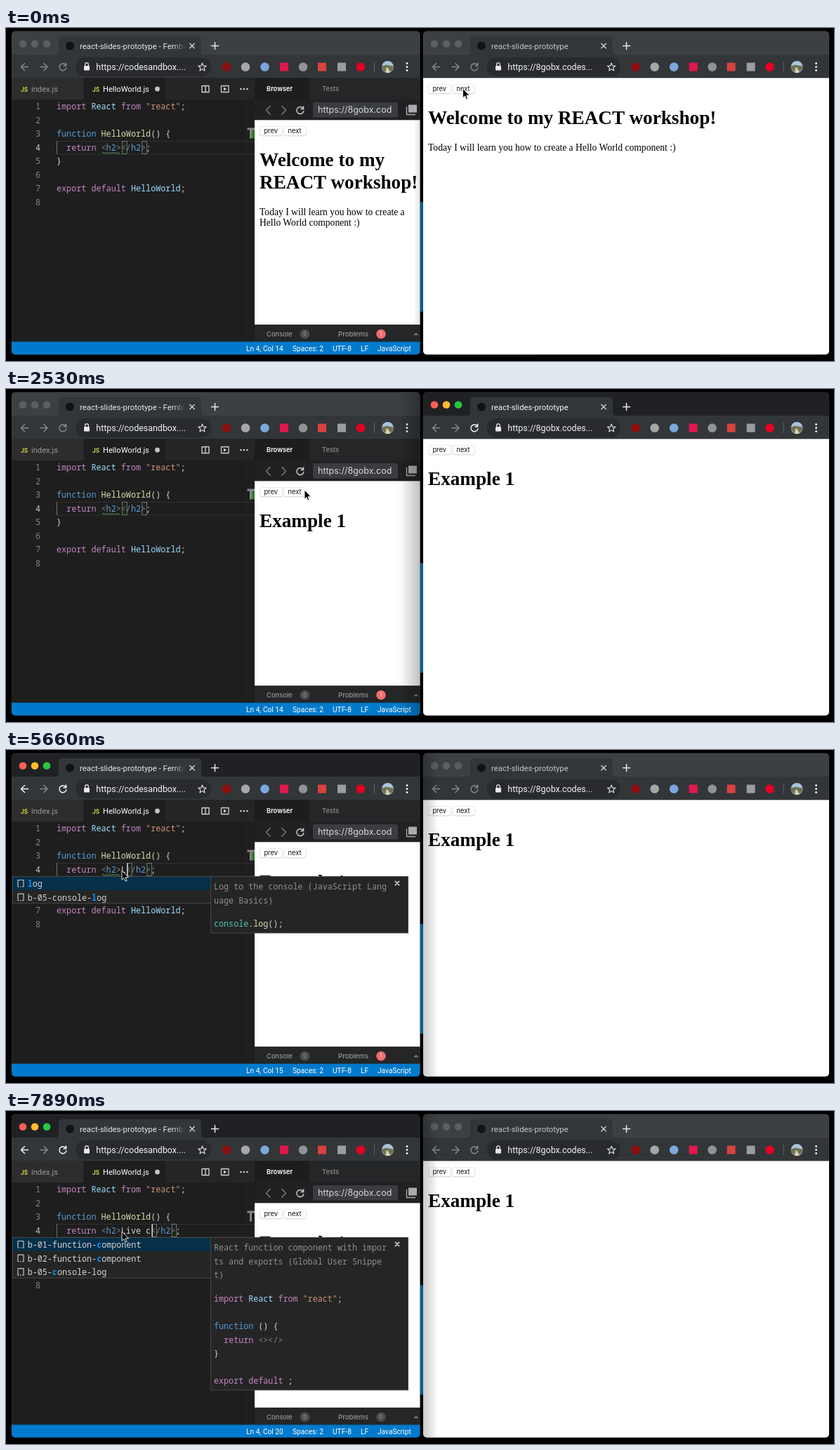
Animation, 1179 px wide and 475 px high, one loop 8000 ms. Source, as an HTML page:

```html
<!DOCTYPE html>
<html lang="en">
<head>
<meta charset="utf-8">
<title>Live coding slides</title>
<style>
html, body { margin: 0; width: 100%; height: 100%; overflow: hidden; background: #000; }
svg { display: block; width: 1179px; height: 475px; }
text { white-space: pre; }
.ui { font-family: Roboto, sans-serif; }
.inter { font-family: Inter, sans-serif; }
.mono { font: 11.77px "Noto Sans Mono", monospace; fill: #d4d4d4; }
.pop .mono { font-size: 11.72px; }
.serif { font-family: "Liberation Serif", "Times New Roman", serif; }
.line { fill: none; stroke-linecap: round; stroke-linejoin: round; }
.strip { fill: #3c4043; }
.on .strip { fill: #202124; }
.light { fill: #5b5e62; }
.on .light { fill: var(--c); }
.title { fill: #c3c6ca; }
.on .title { fill: #f4f5f6; }
.dim, .lit { stroke: #85898d; }
.on .lit { stroke: #f1f3f4; }
.k { fill: #c586c0; } .v { fill: #9cdcfe; } .s { fill: #ce9178; }
.f { fill: #569cd6; } .n { fill: #dcdcaa; } .g { fill: #808080; }
.c { fill: #4ec9b0; } .h { fill: #0097fb; font-weight: 600; } .p { fill: #d4d4d4; }
.d { fill: #8f8f8f; }
.off { display: none; }
</style>
</head>
<body>
<svg id="stage" viewBox="0 0 1179 475" xmlns="http://www.w3.org/2000/svg"></svg>
<script>
const LOOP = 8000, CH = 7.062, LINE = 19.57;
const rowY = n => 116 + LINE * (n - 1);
const esc = s => s.replace(/&/g, '&amp;').replace(/</g, '&lt;');
const paint = fill => fill ? `fill="${fill}"` : '';
const rect = (x, y, w, h, fill, extra = '') =>
  `<rect x="${x}" y="${y}" width="${w}" height="${h}" ${paint(fill)} ${extra}/>`;
const disc = (x, y, r, fill, extra = '') => `<circle cx="${x}" cy="${y}" r="${r}" ${paint(fill)} ${extra}/>`;
const text = (x, y, size, str, fill, cls = 'ui', extra = '') =>
  `<text x="${x}" y="${y}" font-size="${size}" fill="${fill}" class="${cls}" ${extra}>${esc(str)}</text>`;
const line = (d, color, w = 1.3, cls = '') =>
  `<path d="${d}" ${color ? `stroke="${color}"` : ''} stroke-width="${w}" class="line ${cls}"/>`;
const group = (id, body, cls = '') => `<g id="${id}" class="${cls}">${body}</g>`;
const cross = (x, y, r, color, w) => line(`M${x - r} ${y - r}l${2 * r} ${2 * r}m0 ${-2 * r}l${-2 * r} ${2 * r}`, color, w);

// Code is written as "k:import |v:React": a class letter, then its text.
const spans = src => src.split('|').map(p => `<tspan class="${p[0]}">${esc(p.slice(2))}</tspan>`).join('');
const code = (x, y, src, id = '') => `<text x="${x}" y="${y}" class="mono" ${id && `id="${id}"`}>${spans(src)}</text>`;

const IMPORT = 'k:import |v:React |k:from |s:"react"|p:;';

function reload(x, y, cls, color) {
  return line(`M${x + 4} ${y - 2.8}a5 5 0 1 0 .9 4M${x + 4.6} ${y - 5.4}v3.6h-3.6`, color, 1.5, cls);
}

// Tab strip and toolbar; the tools right of the address sit at their own offset.
function chrome(x, tools, title, url, titleFill, backCls) {
  const at = n => x + n, tool = n => tools + n;
  const arrow = (cx, dir, cls) =>
    line(`M${cx - 5 * dir} 55.5H${cx + 5 * dir}M${cx} 50.5L${cx + 5 * dir} 55.5L${cx} 60.5`, '', 1.5, cls);
  const lights = ['#ff5f57', '#febc2e', '#28c840']
    .map((c, i) => disc(at(24 + 17 * i), 22.5, 5.3, '', `class="light" style="--c:${c}"`)).join('');
  const badges = [[314, '#8d0c10', 1], [341, '#a5a8ab', 1], [368.5, '#7ba7dc', 1], [396, '#e0184d', 0],
    [423, '#8f9396', 1], [450, '#d8433f', 0], [478, '#9a9da0', 0], [505, '#e60023', 1]]
    .map(([n, c, round]) => round ? disc(tool(n), 55.5, 6.3, c) : rect(tool(n) - 6, 49.5, 12, 12, c)).join('');
  const star = Array.from({length: 10}, (_, i) => {
    const a = Math.PI * (i / 5 - .5), r = i % 2 ? 2.6 : 6;
    return (tool(279.5) + r * Math.cos(a)).toFixed(1) + ' ' + (56 + r * Math.sin(a)).toFixed(1);
  }).join('L');
  const ax = tool(543.5);
  return rect(at(8), 4, 582, 35, '', 'class="strip"') +
    `<path fill="#323639" d="M${at(69)} 38.5q6 0 6-6v-15q0-6 6-6h191q6 0 6 6v15q0 6 6 6z"/>` +
    rect(at(8), 38, 582, 33.3, '#323639') + lights +
    disc(at(91), 25.5, 6, '#111315') +
    `<text x="${at(105)}" y="29.5" font-size="11.36" class="ui title" ${titleFill ? `style="fill:${titleFill}"` : ''}>${title}</text>` +
    cross(at(265), 25.5, 3.3, '#d5d7d9', 1.3) +
    line(`M${at(292.5)} 25.5h10m-5 -5v10`, '#e6e8ea', 1.5) +
    arrow(at(26.5), -1, backCls) + arrow(at(54), 1, 'dim') + reload(at(81), 55.5, 'lit', '') +
    rect(at(99), 42, tool(292) - at(99), 27, '#282a2d', 'rx="13.5"') +
    rect(at(111), 54, 8, 6.5, '#e8eaed', 'rx="1"') +
    line(`M${at(112.7)} 54v-2a2.3 2.3 0 0 1 4.6 0v2`, '#e8eaed') +
    text(at(128.3), 60, 12.45, url, '#f1f3f4') +
    line(`M${star}Z`, '#e8eaed', 1.1) + badges +
    rect(tool(524), 48, 1, 15, '#5f6368') +
    disc(ax, 55.5, 8.5, '#a9c4dc') +
    `<path fill="#6f7250" d="M${ax - 8.4} 54.5l6 -2l10.8 2a8.5 8.5 0 0 1 -16.8 2z"/>` +
    `<path fill="#d8cfae" d="M${ax - 3} 63.4l1 -7h2l4 6.6q-3.5 1.6 -7 .4z"/>` +
    [50.5, 55.5, 60.5].map(y => disc(tool(571), y, 1.4, '#f1f3f4')).join('');
}

function button(x, y, label) {
  return rect(x + .5, y + .8, 32, 13.5, '#c4c4c4', 'rx="3"') +
    rect(x + .5, y + .3, 32, 13.2, '#fff', 'rx="3" stroke="#dcdcdc" stroke-width=".6"') +
    text(x + 6.4, y + 10.4, 9.35, label, '#111', 'inter');
}

function slides(x, y, heading, para) {
  const h1 = rows => rows.map((s, i) => text(x, y + 57.3 + 31.5 * i, 27.2, s, '#000', 'serif', 'font-weight="700"')).join('');
  const p = rows => rows.map((s, i) => text(x, y + 63.5 + 31.5 * heading.length + 15.7 * i, 13.6, s, '#000', 'serif')).join('');
  return button(x, y, 'prev') + button(x + 34, y, 'next') +
    `<g class="intro">${h1(heading)}${p(para)}</g>` +
    `<g class="example off">${h1(['Example 1'])}</g>`;
}

function editor() {
  const rows = [IMPORT, 'p:', 'f:function |n:HelloWorld|p:() {', '', 'p:}', 'p:', 'k:export default |v:HelloWorld|p:;', 'p:'];
  const body = rows.map((src, i) => src && code(72, rowY(i + 1), src)).join('');
  const nums = rows.map((_, i) =>
    `<text x="49" y="${rowY(i + 1)}" text-anchor="end" class="mono" style="fill:${i == 3 ? '#c6c6c6' : '#858585'}">${i + 1}</text>`).join('');
  const bracket = id => rect(0, 161.5, 6.6, 18, '#1b241b', `id="${id}" stroke="#7c7c7c" stroke-width=".9"`);
  return rect(8, 71, 346, 377, '#1e1e1e') + rect(8, 71, 346, 31, '#252526') +
    rect(8, 71, 102, 31, '#2d2d2d') + rect(111, 71, 116, 31, '#1e1e1e') +
    text(21, 90.5, 8.5, 'JS', '#cbcb41', 'ui', 'font-weight="700"') + text(36, 90.8, 11.15, 'index.js', '#9b9b9b') +
    text(123, 90.5, 8.5, 'JS', '#cbcb41', 'ui', 'font-weight="700"') + text(138, 90.8, 11.15, 'HelloWorld.js', '#fff') +
    disc(215.5, 87, 3.4, '#c5c5c5') +
    line('M279 82.5h10v9h-10zM284 82.5v9', '#d0d0d0', 1.4) +
    line('M306.5 82.5h10.5v9h-10.5z', '#d0d0d0', 1.3) + '<path d="M310 84.6l4.2 2.4l-4.2 2.4z" fill="#d0d0d0"/>' +
    [334.5, 339, 343.5].map(x => disc(x, 87, 1.3, '#d0d0d0')).join('') +
    rect(342.5, 102, .8, 345, '#282828') +
    rect(72, 161, 282, .9, '#333') + rect(72, 179.5, 282, .9, '#333') + rect(72, 161, 1, 19, '#707070') +
    nums + body + bracket('open') + bracket('close') + code(72, rowY(4), 'p:', 'typed') +
    group('lint', line('M137.5 178.3q1.2 -2.4 2.4 0' + 't2.4 0'.repeat(9), '#6bb36b', 1) + rect(350, 143, 4, 14.5, '#2f7a2f')) +
    '<path fill="#858585" d="M343.5 142.5h10.5v3h-4v12h-3v-12h-3.5z"/>' +
    rect(165, 161.5, 1.3, 18, '#e8e8e8', 'id="caret"');
}

function preview() {
  return rect(354, 71, 236, 377, '#1c1d1e') + rect(432, 71, 158, 31, '#252628') +
    rect(354, 102, 236, 29.5, '#202122') +
    text(371, 90.3, 9.3, 'Browser', '#fff', 'inter', 'font-weight="600"') + text(450, 90.3, 9.4, 'Tests', '#8d8f91', 'inter', 'font-weight="500"') +
    line('M376 111.5l-5.5 5.8l5.5 5.8M393 111.5l5.5 5.8l-5.5 5.8', '#77797b', 1.5) + reload(419, 117.3, '', '#c4c6c8') +
    rect(437, 106, 121, 21.5, '#3a3c3f', 'rx="2"') + text(444, 121.3, 12.5, 'https://8gobx.cod', '#d6d8da', 'inter') +
    rect(573, 109.5, 12, 11, '#a9abad') + line('M570.5 112.5v11h12', '#a9abad', 1.4) +
    rect(354, 131.3, 236, 292, '#fff') +
    slides(361, 140, ['Welcome to my', 'REACT workshop!'], ['Today I will learn you how to create a', 'Hello World component :)']) +
    rect(354, 423.3, 236, 24, '#242627') +
    text(371, 440, 9.4, 'Console', '#96989a', 'inter', 'font-weight="500"') + disc(425.5, 436.5, 6.8, '#4c4e50') +
    text(425.5, 439.2, 7, '0', '#a5a7a9', 'inter', 'text-anchor="middle"') +
    text(473, 440, 9.6, 'Problems', '#96989a', 'inter', 'font-weight="500"') + disc(534, 436.5, 6.8, '#f36b6b', 'id="badge"') +
    text(534, 439.2, 7, '1', '#fff', 'inter', 'text-anchor="middle" id="count"') +
    line('M581.7 438l2.2 -2.2l2.2 2.2', '#a5a7a9', 1.1);
}

function status() {
  const item = (x, s, extra) => text(x, 460.7, 10.2, s, '#fff', 'ui', extra);
  return rect(8, 447.5, 582, 20, '#007acc') + item(342, 'Ln 4, Col 14', 'id="pos"') + item(408, 'Spaces: 2') +
    item(465, 'UTF-8') + item(505, 'LF') + item(529, 'JavaScript');
}

// Suggestion list with its details panel.
function popup(id, items, height, about, snippet, snippetTop) {
  const border = 'stroke="#454545" stroke-width="1"';
  return group(id,
    rect(9.5, 180.5, 282, items.length * LINE - 1, '#252526', border) + rect(10, 181, 281, 18.7, '#062f4a') +
    items.map((src, i) => {
      const y = 195 + LINE * i;
      return line(`M17 ${y - 9.5}h8v9.5M17 ${y - 9.5}v9.5`, '#c5c5c5', 1.2) +
        `<path d="M17 ${y}h8" stroke="#c5c5c5" stroke-width="1.2" stroke-dasharray="1.5 1.5"/>` + code(30.7, y, src);
    }).join('') +
    rect(291.5, 180.5, 281, height, '#252526', border) + cross(557, 190, 2.7, '#c8c8c8', 1.7) +
    about.map((s, i) => code(296, 199 + LINE * i, 'd:' + s)).join('') +
    snippet.map((src, i) => code(296, snippetTop + LINE * i, src)).join(''), 'pop off');
}

const shade = (id, from, to, dark, clear) =>
  `<linearGradient id="${id}" gradientUnits="userSpaceOnUse" x1="${from}" x2="${to}"><stop stop-opacity="${dark}"/><stop offset="1" stop-opacity="${clear}"/></linearGradient>`;
const clip = (id, x, w) => `<clipPath id="${id}">${rect(x, 4.5, w, 461.2, '#000', 'rx="5"')}</clipPath>`;
const rim = (x, w) => rect(x + .4, 4.9, w - .8, 460.4, 'none', 'rx="5" stroke="#fff" stroke-opacity=".08" stroke-width=".8"');

stage.innerHTML = `<defs>${clip('clipL', 8, 581.5)}${clip('clipR', 594, 578)}
  ${shade('restFill', 589, 582, .09, .03)}${shade('leftFill', 589, 561, .24, .01)}${shade('rightFill', 594, 613, .21, .03)}
  <linearGradient id="fade" gradientUnits="userSpaceOnUse" x1="238" x2="255"><stop stop-color="#e4e6e8"/><stop offset="1" stop-color="#e4e6e8" stop-opacity="0"/></linearGradient></defs>` +
  rect(0, 0, 1179, 475, '#000') + rect(589.5, 248, 4.5, 157, '#0a5f91', 'rx="2"') +
  `<g clip-path="url(#clipL)">` +
  group('left', chrome(0, 0, 'react-slides-prototype - Fernbuckler', 'https://codesandbox....', 'url(#fade)', 'lit') +
    editor() + preview() + status() +
    rect(582, 131.3, 8, 292, 'url(#restFill)', 'id="restShade"') +
    rect(557, 4, 33, 463, 'url(#leftFill)', 'id="leftShade" class="off"')) +
  '</g>' + rim(8, 581.5) +
  `<g clip-path="url(#clipR)">` +
  group('right', rect(594, 71, 578, 396, '#fff') + chrome(586, 582.6, 'react-slides-prototype', 'https://8gobx.codes...', '', 'dim') +
    slides(601, 80, ['Welcome to my REACT workshop!'], ['Today I will learn you how to create a Hello World component :)']) +
    rect(594, 4, 19, 463, 'url(#rightFill)', 'id="rightShade" class="off"')) +
  '</g>' + rim(594, 578) +
  popup('popLog', ['h:l|p:og', 'p:b-05-console-|h:l|p:og'], 80.5,
    ['Log to the console (JavaScript Lang', 'uage Basics)'], ['c:console|p:.|n:log|p:();'], 252) +
  popup('popC', ['p:b-01-function-|h:c|p:omponent', 'p:b-02-function-|h:c|p:omponent', 'p:b-05-|h:c|p:onsole-log'], 217.5,
    ['React function component with impor', 'ts and exports (Global User Snippe', 't)'],
    [IMPORT, 'p:', 'f:function |p:() {', 'k:  return |g:<></>', 'p:}', 'p:', 'k:export default |p:;'], 272) +
  '<path id="mouse" d="M0 0v13.2l3 -2.8l2 4.8l2.1 -.9l-2 -4.6h4.3z" fill="#000" stroke="#fff" stroke-width=".9" stroke-linejoin="round"/>';

const el = id => document.getElementById(id);
const show = (node, on) => node.classList.toggle('off', !on);
const within = (t, a, b) => t >= a && t < b;
const KEYS = [5660, 6110, 6550, 6990, 7440, 7740];

// The pointer advances in discrete steps along an eased path.
function leg(t, start, end, steps) {
  if (t < start) return 0;
  const gap = (end - start) / (steps - 1);
  const k = Math.min(steps, Math.floor((t - start + 2) / gap) + 1);
  return .5 - .5 * Math.cos(Math.PI * k / steps);
}

function pointer(t) {
  const a = leg(t, 1940, 2530, 5), b = leg(t, 2830, 3730, 7);
  return [650.5 - 225.5 * a - 260 * b, 86.5 + 57.5 * a + 28 * b + 16 * Math.sin(Math.PI * b)];
}

function draw(t) {
  const typed = 'Live c'.slice(0, KEYS.filter(k => t >= k).length);
  const col = 165.2 + CH * typed.length;
  const leftOn = t >= 4320, rightOn = within(t, 450, 4320), clean = t >= 6250;

  el('left').classList.toggle('on', leftOn);
  el('right').classList.toggle('on', rightOn);
  show(el('restShade'), t < 450);
  show(el('leftShade'), rightOn);
  show(el('rightShade'), leftOn);
  document.querySelectorAll('.intro').forEach(n => show(n, t < 1040));
  document.querySelectorAll('.example').forEach(n => show(n, t >= 1040));

  el('typed').innerHTML = spans(`k:  return |g:<|f:h2|g:>|p:${typed}|g:</|f:h2|g:>|p:;`);
  el('open').setAttribute('x', col + .4);
  el('close').setAttribute('x', col + 4 * CH + .4);
  el('caret').setAttribute('x', col);
  show(el('caret'), within(t, 4320, 4770) || t >= 5220);
  el('pos').textContent = 'Ln 4, Col ' + (14 + typed.length);

  show(el('lint'), !clean);
  el('badge').setAttribute('fill', clean ? '#4c4e50' : '#f36b6b');
  el('count').setAttribute('fill', clean ? '#a5a7a9' : '#fff');
  el('count').textContent = clean ? '0' : '1';
  show(el('popLog'), within(t, 5660, 6110));
  show(el('popC'), t >= 7890);
  el('mouse').setAttribute('transform', `translate(${pointer(t)})`);
}

const begin = performance.now();
function tick() {
  draw((performance.now() - begin) % LOOP);
  requestAnimationFrame(tick);
}
tick();
</script>
</body>
</html>
```
